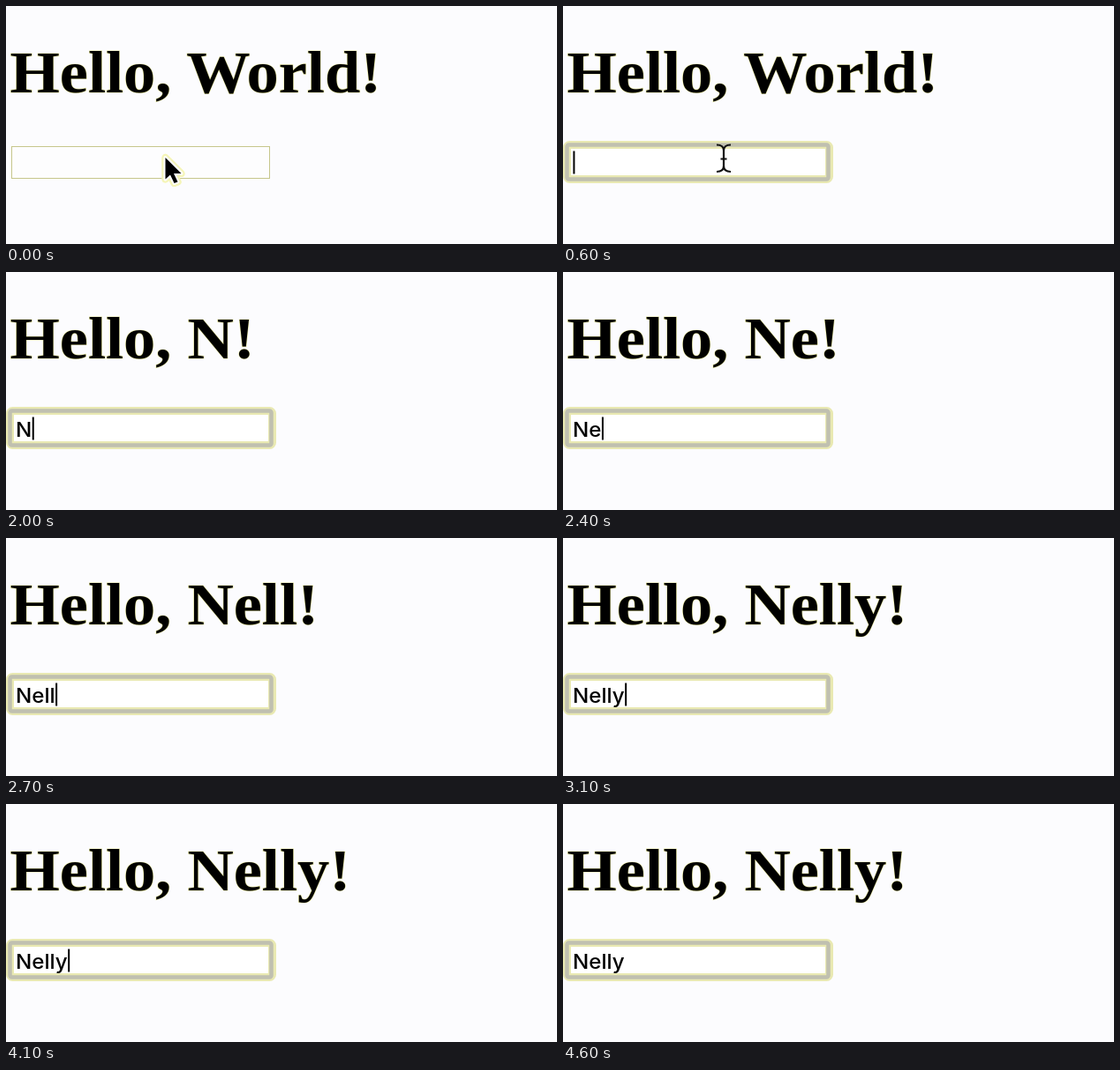
Write an HTML page that moves like this. It is 624x270 px and loops after 4.7 s.

```html
<!DOCTYPE html>
<html lang="en">
<head>
<meta charset="utf-8">
<title>Greeting</title>
<style>
  html, body { margin: 0; height: 100%; overflow: hidden; background: #fcfcfe; }
  svg { display: block; width: 624px; height: 270px; }
  #title {
    font: bold 67px "Liberation Serif", "Times New Roman", serif;
    stroke: #ececa6; stroke-width: 1.2px; paint-order: stroke;
  }
  #field { font: 500 22.4px Inter, Roboto, sans-serif; }
</style>
</head>
<body>
<svg viewBox="0 0 624 270">
  <rect id="border" x="6.5" y="159.5" width="292" height="36" fill="#fdfdfe" stroke="#c6c68c"/>
  <g id="ring" fill="none">
    <rect x="4.5" y="157.500" width="297" height="39" rx="3" fill="#fff" stroke="#e9e9b2" stroke-width="9"/>
    <rect x="4.5" y="157.500" width="296" height="39" rx="2" stroke="#c0c0b0" stroke-width="4.500"/>
  </g>

  <!-- the page is shown with wide pixels -->
  <g transform="scale(1.08 1)">
    <text id="title" x="4.2" y="97.700"></text>
    <text id="field" x="10.2" y="187"></text>
    <rect id="caret" y="164.500" width="1.850" height="26"/>
  </g>

  <g id="arrow" stroke-linejoin="round">
    <path id="tip" d="M180.500 172V196.500L186 191.500L190.500 201L194.500 199.500L190 190H198.500Z"
      stroke="#f5f5b8" stroke-width="8"/>
    <use href="#tip" style="stroke: #fff"/>
    <path d="M180.500 172V196.500L186 191.500L190.500 201L194.500 199.500L190 190H198.500Z"
      stroke="#fff" stroke-width="4" paint-order="stroke"/>
  </g>
  <path id="beam" fill="none" stroke="#111" stroke-width="2.200"
    d="M174 157.500Q182 157.500 182 164V181.500Q182 188 174 188M190 157.500Q182 157.500 182 164V181.500Q182 188 190 188M178.500 173.500H185.500"/>
</svg>

<script>
  const LOOP = 4700, FOCUS = 600, BLINK = 500;
  const NAME = "Nelly";
  const KEYS = [2000, 2300, 2500, 2700, 3100];
  const $ = id => document.getElementById(id);
  const show = (id, on) => $(id).style.display = on ? "" : "none";

  function draw(t) {
    const focused = t >= FOCUS;
    const count = KEYS.filter(k => t >= k).length;
    const typed = NAME.slice(0, count);
    // The caret restarts its blink at focus and after each key.
    const since = t - (count ? KEYS[count - 1] : FOCUS);

    $("title").textContent = `Hello, ${typed || "World"}!`;
    $("field").textContent = typed;
    $("caret").setAttribute("x", 10.6 + (count ? $("field").getComputedTextLength() : 0));

    show("border", !focused);
    show("arrow", !focused);
    show("ring", focused);
    show("beam", focused && !count);
    show("caret", focused && Math.floor(since / BLINK) % 2 === 0);
  }

  const start = performance.now();
  function tick() {
    draw((performance.now() - start) % LOOP);
    requestAnimationFrame(tick);
  }
  tick();
</script>
</body>
</html>
```
